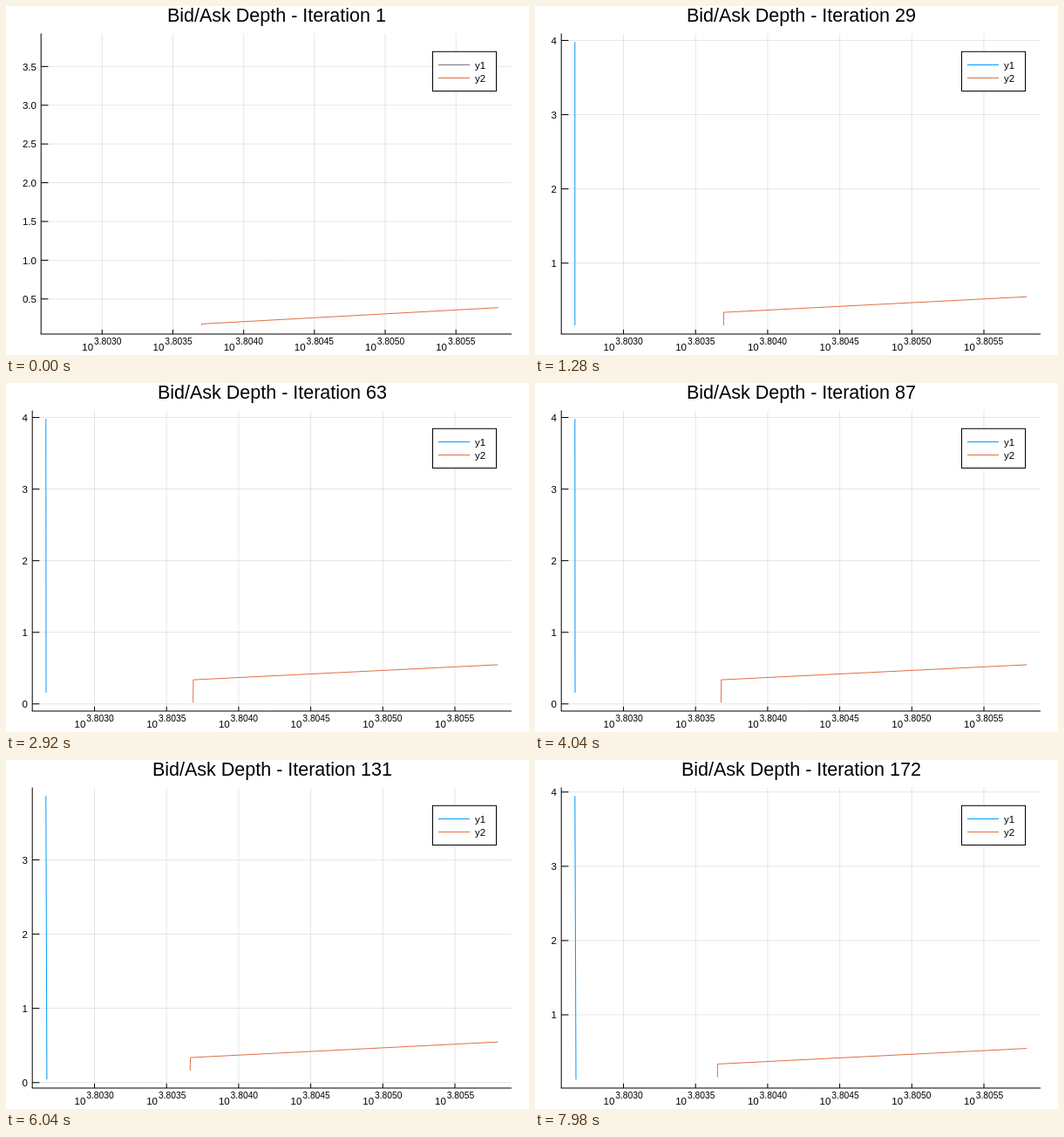
An HTML page with a canvas for the animation above (8 s loop, 600 px wide and 400 px high).

```html
<!DOCTYPE html>
<html lang="en">
<head>
<meta charset="utf-8">
<title>Bid/Ask Depth</title>
<style>
html, body { margin: 0; width: 100%; height: 100%; overflow: hidden; background: #fff; }
canvas { display: block; }
</style>
</head>
<body>
<canvas id="stage" width="600" height="400"></canvas>
<script>
const ctx = document.getElementById('stage').getContext('2d');
const LOOP = 8000;
const BLUE = '#009afa', ORANGE = '#e26f46';
const FONT = '"Liberation Sans", Arial, sans-serif';
const RIGHT = 580, TOP = 31.5, BOTTOM = 376;

// Order book phases: first iteration, bid depth range, bid slant in px, best ask depth, second ask depth
const phases = [
  { from: 1,   bid: [3.816, 3.816], slant: 0,   ask: [0.157, 0.178] },
  { from: 6,   bid: [0.159, 3.979], slant: 0,   ask: [0.159, 0.337] },
  { from: 32,  bid: [0.157, 3.979], slant: 0.2, ask: [0.019, 0.337] },
  { from: 99,  bid: [0.041, 3.860], slant: 1,   ask: [0.160, 0.337] },
  { from: 110, bid: [0.041, 4.016], slant: 0.5, ask: [0.019, 0.178] },
  { from: 120, bid: [0.041, 3.860], slant: 1.1, ask: [0.160, 0.337] },
  { from: 160, bid: [0.128, 3.947], slant: 1.2, ask: [0.019, 0.337] },
  { from: 169, bid: [0.128, 3.947], slant: 1.2, ask: [0.160, 0.337] }
];
const LAST_LEVEL = 0.21;

function line(color, ...points) {
  ctx.strokeStyle = color;
  ctx.beginPath();
  points.forEach(([x, y]) => ctx.lineTo(x, y));
  ctx.stroke();
}

function text(string, x, y, size, align = 'left') {
  ctx.font = `${size}px ${FONT}`;
  ctx.fontKerning = 'none';
  ctx.textAlign = align;
  ctx.fillStyle = '#000';
  ctx.fillText(string, x, y);
}

// Iterations last 20, 100 and 20 ms in turn.
function iterationAt(time) {
  const rest = time % 140;
  return Math.floor(time / 140) * 3 + (rest < 20 ? 1 : rest < 120 ? 2 : 3);
}

function drawLegend(bidColor) {
  ctx.fillStyle = '#fff';
  ctx.fillRect(489.5, 52.3, 73, 45.2);
  ctx.strokeStyle = '#000';
  ctx.strokeRect(489.5, 52.3, 73, 45.2);
  line(bidColor, [496, 67.5], [532, 67.5]);
  line(ORANGE, [496, 82.5], [532, 82.5]);
  text('y1', 538, 72.4, 11.5);
  text('y2', 538, 87.4, 11.5);
}

function draw(iteration) {
  const phase = phases.filter(p => p.from <= iteration).pop();
  const opening = phase === phases[0];
  const left = opening ? 40.2 : 30.2;
  const [firstTick, tickGap] = opening ? [110.3, 81.18] : [101.5, 82.7];
  const xAt = u => firstTick + u * tickGap;
  const low = Math.min(phase.bid[0], phase.ask[0]);
  const high = phase.bid[1];
  const yAt = v => 366.25 - (v - low) / (high - low) * 325;

  ctx.fillStyle = '#fff';
  ctx.fillRect(0, 0, 600, 400);
  ctx.lineWidth = 1;

  const xTicks = [0, 1, 2, 3, 4, 5];
  const yStep = opening ? 0.5 : 1;
  const yTicks = [];
  for (let v = 0; yAt(v) > TOP; v += yStep) if (yAt(v) < BOTTOM) yTicks.push(v);

  const grid = 'rgba(0,0,0,0.1)';
  xTicks.forEach(i => line(grid, [xAt(i), TOP], [xAt(i), BOTTOM]));
  yTicks.forEach(v => line(grid, [left, yAt(v)], [RIGHT, yAt(v)]));

  line('#000', [left, TOP], [left, BOTTOM]);
  line('#000', [left - 0.5, BOTTOM], [RIGHT, BOTTOM]);
  xTicks.forEach(i => {
    const x = xAt(i);
    line('#000', [x, BOTTOM], [x, BOTTOM - 5.2]);
    text('10', x - 23, 395, 11.5);
    text((3.803 + i * 0.0005).toFixed(4), x - 9.3, 388, 10.3);
  });
  yTicks.forEach(v => {
    line('#000', [left, yAt(v)], [left + 8.2, yAt(v)]);
    text(v.toFixed(opening ? 1 : 0), left - 5.3, yAt(v) + 4.2, 11.5, 'right');
  });

  const bidX = xAt(-0.6735);
  if (!opening) line(BLUE, [bidX, yAt(high)], [bidX + phase.slant, yAt(phase.bid[0])]);

  // The best ask drifts steadily towards the bid.
  const askX = xAt(1.4075 - 0.000593 * (iteration - 1));
  const [best, second] = phase.ask;
  line(ORANGE, [askX - 0.2, yAt(best)], [askX, yAt(second)], [xAt(5.597), yAt(second + LAST_LEVEL)]);

  drawLegend(opening ? '#777' : BLUE);
  text(`Bid/Ask Depth - Iteration ${iteration}`, (left + RIGHT) / 2 + 0.3, 18.3, 21.5, 'center');
}

const start = performance.now();
function tick() {
  draw(iterationAt((performance.now() - start) % LOOP));
  requestAnimationFrame(tick);
}
tick();
</script>
</body>
</html>
```
